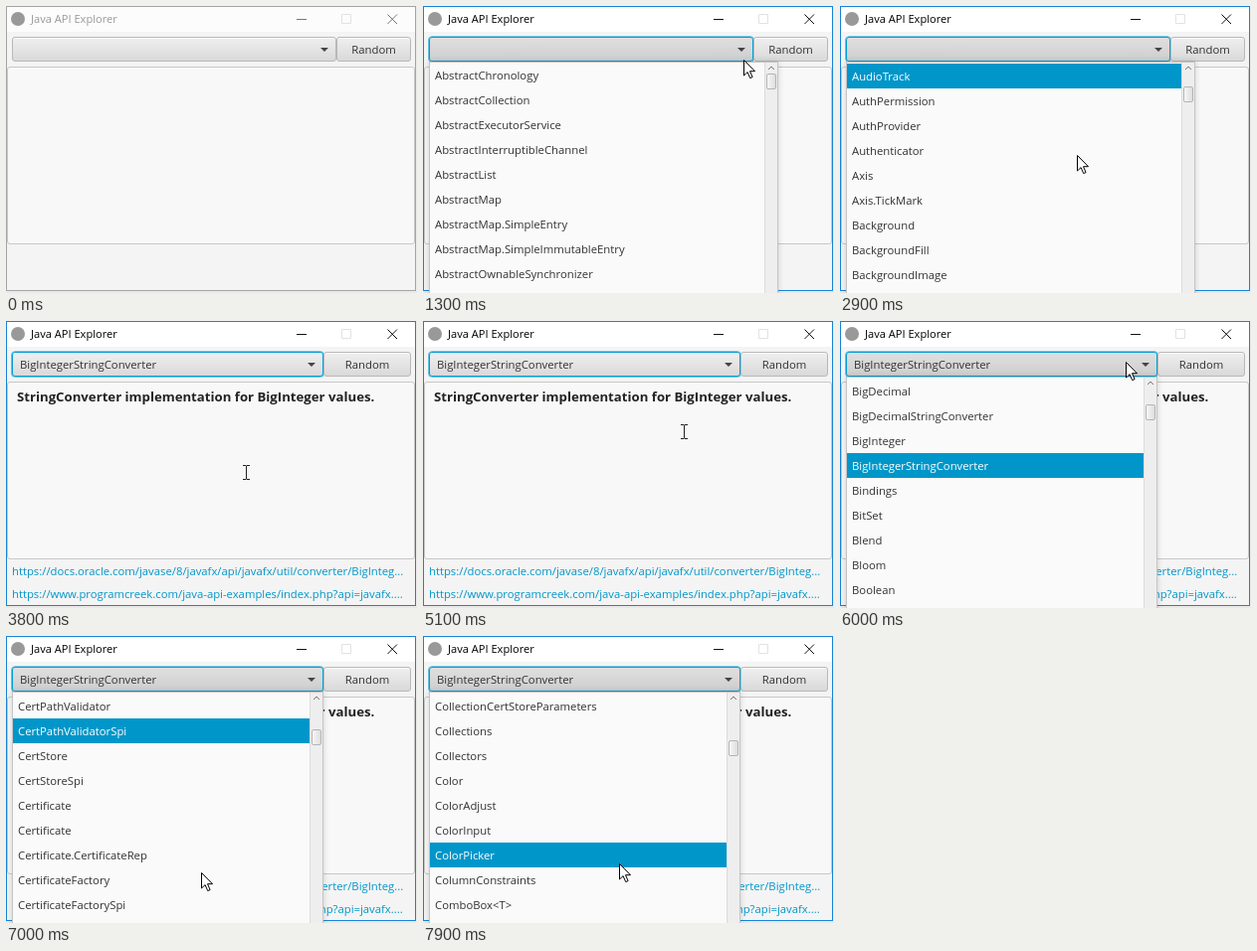
Animation of 413 by 289 pixels, one loop 8000 ms. Source, as an HTML page:

```html
<!DOCTYPE html>
<html lang="en">
<head>
<meta charset="utf-8">
<title>Java API Explorer</title>
<style>
html, body { margin: 0; width: 100%; height: 100%; overflow: hidden; background: #e9e9e9; }
body, div, svg { box-sizing: border-box; }
body { position: relative; font: 11.3px "Open Sans", "Noto Sans", sans-serif; color: #323232; }
div, svg { position: absolute; white-space: nowrap; }
#win { left: 0; top: 0; width: 412px; height: 287px; background: #f4f4f4; border: 1px solid #a5a5a5; }
#bar { left: 1px; top: 1px; width: 410px; height: 25px; background: #fcfcfc; }
#title { left: 25px; top: 0; line-height: 26px; font-size: 11.1px; color: #999; }
#icon { left: 5px; top: 6px; width: 14px; height: 14px; border-radius: 50%; background: #999; }
#chrome { left: 0; top: 0; fill: none; stroke: #777; }
.active #win { border-color: #1883d7; }
.active #bar { background: #fff; }
.active #title { color: #000; }
.active #chrome { stroke: #111; }
.btn { top: 31px; height: 25px; line-height: 23px; border: 1px solid #b8b8b8; border-radius: 3px;
  background: linear-gradient(#efefef, #d9d9d9); box-shadow: inset 0 1px #fafafa; }
.btn.hover { background: linear-gradient(#f7f7f7, #e4e4e4); }
.btn.down { background: linear-gradient(#dfdfdf, #cecece); box-shadow: none; }
#combo { left: 6px; padding-left: 7px; }
.active #combo { border-color: #039ed3; box-shadow: 0 0 0 .6px #039ed3; }
#combo::after { content: ""; position: absolute; right: 7px; top: 10px;
  border: 4px solid transparent; border-top-color: #444; border-bottom: 0; }
#random { text-align: center; }
#area { left: 1px; top: 61px; width: 410px; height: 179px; border: 1px solid #c8c8c8; border-radius: 3px; background: #f8f8f8; }
#doc { left: 11px; top: 66px; line-height: 20px; font-size: 13.2px; font-weight: bold; color: #222; }
.link { left: 6px; line-height: 25px; color: #0096c9; }
#popup { left: 6px; top: 56px; height: 260px; border: 1px solid #c4c4c4; background: #fafafa;
  box-shadow: 0 0 6px rgba(0,0,0,.16); }
#rows { left: 0; right: 13px; }
#rows div { left: 0; width: 100%; height: 25px; line-height: 25px; padding-left: 5px; }
#rows .on { background: #0096c9; color: #fff; }
#track { right: 0; top: 0; width: 13px; height: 258px; background: #eee; border-left: 1px solid #dcdcdc; }
#track svg { left: 2px; top: 2px; fill: none; stroke: #777; }
#thumb { left: 1px; width: 10px; height: 16px; border: 1px solid #b4b4b4; border-radius: 2px;
  background: linear-gradient(90deg, #f6f6f6, #dedede); }
#arrow, #beam { left: 0; top: 0; overflow: visible; }
</style>
</head>
<body>
<div id="win"></div>
<div id="bar"></div>
<div id="icon"></div>
<div id="title">Java API Explorer</div>
<svg id="chrome" width="412" height="26">
  <path d="M292 13.5h10M383.5 8.5l9.5 9.5m0-9.5l-9.5 9.5"/>
  <path d="M337.5 8.5h9v9h-9z" stroke="#e2e2e2"/>
</svg>
<div id="combo" class="btn"></div>
<div id="random" class="btn">Random</div>
<div id="area"></div>
<div id="info">
  <div id="doc">StringConverter implementation for BigInteger values.</div>
  <div class="link" style="top:239px">https://docs.oracle.com/javase/8/javafx/api/javafx/util/converter/BigInteg...</div>
  <div class="link" style="top:262px">https://www.programcreek.com/java-api-examples/index.php?api=javafx....</div>
</div>
<div id="popup">
  <div id="rows"></div>
  <div id="track">
    <svg width="8" height="6"><path d="M1 5l3-3 3 3"/></svg>
    <div id="thumb"></div>
  </div>
</div>
<svg id="arrow" width="13" height="20">
  <path d="M.5 .5v15.5l3.6-3.4 2.6 6 2.4-1-2.6-5.9h5z" fill="#fff" stroke="#000"/>
</svg>
<svg id="beam" width="8" height="16">
  <path d="M-3.5-6.5h3l.5.5.5-.5h3M-3.5 7.5h3l.5-.5.5.5h3M0-6v13" fill="none" stroke="#222"/>
</svg>
<script>
const names = `AbstractChronology AbstractCollection AbstractExecutorService AbstractInterruptibleChannel
AbstractList AbstractMap AbstractMap.SimpleEntry AbstractMap.SimpleImmutableEntry AbstractOwnableSynchronizer
AbstractPreferences AbstractQueue AbstractQueuedLongSynchronizer AbstractQueuedSynchronizer
AbstractSelectableChannel AbstractSelectionKey AbstractSelector AbstractSequentialList AbstractSet
AccessControlContext AccessController AccessibleObject Accordion AclEntry AclEntry.Builder Affine
AlgorithmParameterGenerator AlgorithmParameterGeneratorSpi AlgorithmParameters AlgorithmParametersSpi
AllPermission AmbientLight AnchorPane Animation AnimationTimer Annotation AppConfigurationEntry
Application Arc ArcTo AreaChart Array ArrayBlockingQueue ArrayDeque ArrayList Arrays
AsynchronousChannelGroup AsynchronousFileChannel AsynchronousServerSocketChannel AsynchronousSocketChannel
AtomicBoolean AtomicInteger AtomicIntegerArray AtomicLong AtomicLongArray AtomicMarkableReference
AtomicReference AtomicReferenceArray AtomicStampedReference Attributes Attributes.Name AudioClip
AudioEqualizer AudioTrack AuthPermission AuthProvider Authenticator Axis Axis.TickMark Background
BackgroundFill BackgroundImage BackgroundPosition BackgroundSize BarChart Base64 Base64.Decoder
Base64.Encoder BasicPermission Bidi BigDecimal BigDecimalStringConverter BigInteger
BigIntegerStringConverter Bindings BitSet Blend Bloom Boolean BooleanBinding BooleanExpression
BooleanProperty BooleanPropertyBase BooleanStringConverter Border BorderImage BorderPane BorderStroke
BorderStrokeStyle BorderWidths BoundingBox Bounds Box BoxBlur BreakIterator BubbleChart Buffer
BufferedInputStream BufferedOutputStream BufferedReader BufferedWriter Button ButtonBar ButtonBase
ButtonType Byte ByteArrayInputStream ByteArrayOutputStream ByteBuffer ByteOrder ByteStringConverter CRC32
Calendar Camera Canvas CategoryAxis Cell CertPath CertPathBuilder CertPathBuilderSpi CertPathValidator
CertPathValidatorSpi CertStore CertStoreSpi Certificate Certificate Certificate.CertificateRep
CertificateFactory CertificateFactorySpi Channels CharArrayReader CharArrayWriter CharBuffer Character
Character.Subset Character.UnicodeBlock CharacterStringConverter Charset CharsetDecoder CharsetEncoder
CharsetProvider Chart CheckBox CheckBoxListCell CheckBoxTableCell CheckBoxTreeCell CheckBoxTreeItem
CheckMenuItem CheckedInputStream CheckedOutputStream ChoiceBox ChoiceBoxListCell ChoiceBoxTableCell
ChoiceDialog ChoiceFormat Cipher CipherInputStream CipherOutputStream CipherSpi Circle Class ClassLoader
ClassValue Clipboard ClipboardContent Clock ClosePath CodeSigner CodeSource CoderResult CodingErrorAction
CollationElementIterator CollationKey Collator CollectionCertStoreParameters Collections Collectors Color
ColorAdjust ColorInput ColorPicker ColumnConstraints ComboBox<T> ComboBoxBase`.split(/\s+/);

const $ = id => document.getElementById(id);
const picked = "BigIntegerStringConverter";
const [a, b, c, d] = ["AlgorithmParameters", "BigDecimal", "CertPathValidator", "CollectionCertStoreParameters"]
  .map(n => names.indexOf(n));

// time, x, y
const path = [[100, 392, 46], [200, 368, 44], [300, 340, 46], [400, 322, 48], [1200, 322, 48], [1300, 322, 54],
  [1500, 232, 158], [1600, 232, 158], [1800, 228, 158], [1900, 228, 158], [2000, 234, 144], [2400, 234, 144],
  [2500, 238, 150], [3300, 238, 150], [3400, 239, 150], [3600, 239, 150], [3700, 241, 152], [4900, 241, 152],
  [5400, 294, 50], [5600, 287, 41], [6100, 287, 41], [6400, 196, 238], [7600, 196, 238], [7700, 197, 229]];
// time, index of the first visible row
const scroll = [[1900, 0], [2300, a], [2400, a], [2600, a + (b - a) / 3], [2700, a + (b - a) / 3], [3100, b],
  [6400, b], [7000, c], [7400, c + (d - c) * 4 / 7], [7600, c + (d - c) * 4 / 7], [7900, d]];

function at(keys, t, k = 1) {
  const i = keys.findIndex(p => p[0] > t);
  if (i < 0) return keys[keys.length - 1][k];
  if (i === 0) return keys[0][k];
  const p = keys[i - 1], q = keys[i];
  return p[k] + (q[k] - p[k]) * (t - p[0]) / (q[0] - p[0]);
}
const topRow = t => Math.round(at(scroll, t));

const rows = Array.from({ length: 10 }, () => $("rows").appendChild(document.createElement("div")));
const show = (el, on) => el.style.display = on ? "" : "none";
const span = (el, left, right) => { el.style.left = left + "px"; el.style.width = right - left + "px"; };

function drawList(t, y) {
  const top = topRow(t), base = top ? 58 : 57;
  let on = Math.floor((y - base) / 25);
  // the hover trails behind while the wheel keeps turning
  if (topRow(t + 100) !== top && topRow(t - 100) !== top) on -= t >= 2500 && t < 3200 ? 3 : 6;
  if (t >= 6000 && y < base) on = names.indexOf(picked) - top;
  rows.forEach((row, i) => {
    row.textContent = names[top + i] || "";
    row.className = i === on ? "on" : "";
    row.style.top = base - 57 + 25 * i + "px";
  });
  $("thumb").style.top = Math.round(68 + 37 * top / d) - 57 + "px";
}

function draw(ms) {
  const t = Math.floor(ms / 100) * 100;
  const x = Math.round(at(path, t)), y = Math.round(at(path, t, 2));
  const chosen = t >= 3700, open = t >= 800 && t < 3700 || t >= 6000;
  const edge = chosen ? 319 : 332;
  const over = t >= 100 && y >= 31 && y < 56;

  document.body.className = t >= 600 ? "active" : "";
  span($("combo"), 6, edge);
  span($("random"), edge, 407);
  $("combo").textContent = chosen ? picked : "";
  $("combo").className = "btn" + (open ? " down" : over && x < edge ? " hover" : "");
  $("random").className = "btn" + (over && x >= edge ? " hover" : "");
  show($("info"), t >= 3800);

  show($("popup"), open);
  span($("popup"), 6, chosen ? 319 : 357);
  if (open) drawList(t, y);

  const text = !open && y > 61;
  show($("arrow"), t >= 100 && !text);
  show($("beam"), text);
  $("arrow").style.transform = `translate(${x}px,${y}px)`;
  $("beam").style.transform = `translate(${x + .5}px,${y}px)`;
}

function frame() {
  draw(performance.now() % 8000);
  requestAnimationFrame(frame);
}
frame();
</script>
</body>
</html>
```
